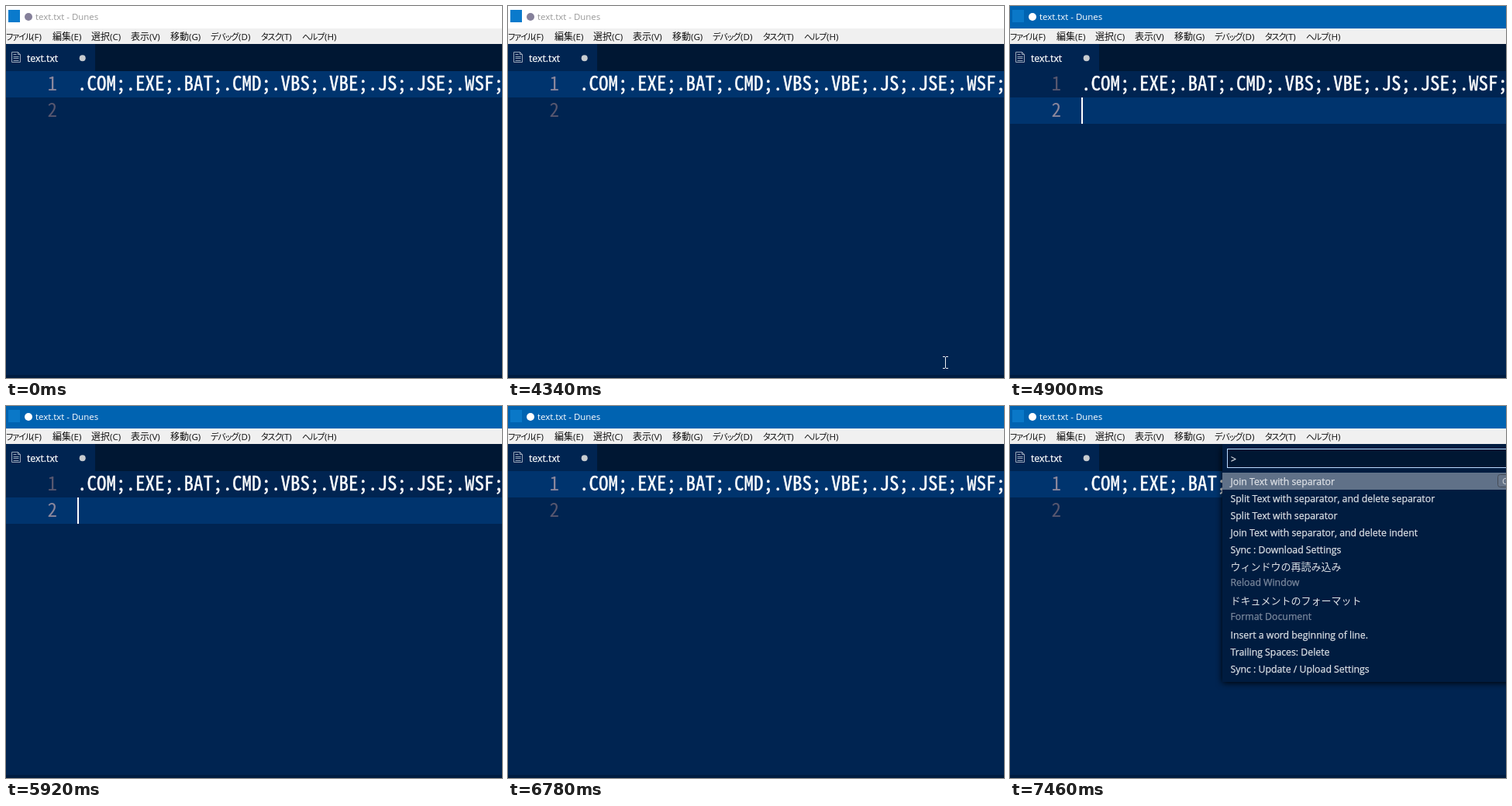
An HTML page for the animation above (8 s loop, 640 by 480 pixels).

```html
<!DOCTYPE html>
<html lang="ja">
<head>
<meta charset="utf-8">
<title>Editor</title>
<style>
  html, body { margin: 0; width: 100%; height: 100%; overflow: hidden; background: #002451; }
  svg { display: block; width: 640px; height: 480px; }
  text { white-space: pre; fill: currentColor; stroke: currentColor; stroke-width: 0; }
  .ui { font: 12.3px "Open Sans", "Noto Sans", sans-serif; stroke-width: .25px; }
  .title { font: 11.45px "Open Sans", "Noto Sans", sans-serif; }
  .key { font: 11.6px "Open Sans", "Noto Sans", sans-serif; }
  .jp { font: 13px "Noto Sans CJK JP", "Noto Sans CJK", sans-serif; }
  .kanji { font: 12px "Noto Sans CJK JP", "Noto Sans CJK", sans-serif; }
  .kana { font: 11px "Noto Sans CJK JP", "Noto Sans CJK", sans-serif;
          font-feature-settings: "palt"; letter-spacing: -1px; }
  .code, .number { font: 25px "Noto Sans Mono CJK JP", "Noto Sans Mono", monospace; }
  .code { stroke-width: .4px; }
</style>
</head>
<body>
<svg id="stage" viewBox="0 0 640 480" xmlns="http://www.w3.org/2000/svg"></svg>
<script>
const LOOP = 8000;
const stage = document.getElementById('stage');

function add(tag, attrs, parent = stage) {
  const el = document.createElementNS('http://www.w3.org/2000/svg', tag);
  for (const name in attrs) el.setAttribute(name, attrs[name]);
  return parent.appendChild(el);
}
const rect = (x, y, width, height, fill, parent) =>
  add('rect', { x, y, width, height, fill }, parent);
function label(str, x, y, cls, color, parent) {
  const el = add('text', { x, y, class: cls, color }, parent);
  el.textContent = str;
  return el;
}
const show = (el, on) => el.setAttribute('visibility', on ? 'visible' : 'hidden');

// Title bar
const titleBar = rect(0, 0, 640, 29, '#fff');
const logo = rect(3, 5, 15, 16, '#0a7acc');
const titleDot = add('circle', { cx: 29, cy: 14, r: 5 });
const titleText = label('text.txt - Dunes', 38, 18, 'title', '#999');

// Menu bar
rect(0, 29, 640, 20, '#f0f0f0');
[
  ['ファイル', 0, '(F)', 33],
  ['編集', 60, '(E)', 84],
  ['選択', 110, '(C)', 134],
  ['表示', 161, '(V)', 185],
  ['移動', 212, '(G)', 236],
  ['デバッグ', 264, '(D)', 300],
  ['タスク', 329, '(T)', 355.5],
  ['ヘルプ', 382, '(H)', 411]
].forEach(([name, x, key, keyX]) => {
  label(name, x, 44, name.length > 2 ? 'kana' : 'kanji', '#111');
  label(key, keyX, 44, 'key', '#111');
});

// Tabs
rect(0, 49, 640, 35, '#001733');
rect(0, 49, 115, 35, '#002451');
add('path', {
  d: 'M7.5 59.5h8l3 3v10h-11zM15.5 59.5v3h3M9.5 62.5h4M9.5 65.5h7M9.5 67.5h7M9.5 70.5h7',
  fill: 'none', stroke: '#9aa5b8'
});
label('text.txt', 27, 72, 'ui', '#fff');
add('circle', { cx: 98.7, cy: 67.2, r: 4, fill: '#c8ccd0' });

// Editor
const lineBar = rect(0, 84, 640, 34, '#00346e');
const numbers = ['1', '2'].map((n, i) => label(n, 53.5, 109 + 34 * i, 'number', '#fff'));
label('.COM;.EXE;.BAT;.CMD;.VBS;.VBE;.JS;.JSE;.WSF;', 92, 109, 'code', '#fff');
const caret = rect(92, 84, 2, 34, '#fff');
rect(0, 476, 640, 4, '#001c40');

// Command palette
const palette = add('g', {});
const clip = add('clipPath', { id: 'below' });
rect(250, 49, 390, 330, '#000', clip);
const shade = add('g', { 'clip-path': 'url(#below)' }, palette);
rect(274, 54, 380, 303, '#000', shade).style.filter = 'blur(4px)';
rect(274, 49, 366, 307, '#001c40', palette);
add('rect', { x: 280.5, y: 55.5, width: 370, height: 24, fill: '#001733', stroke: '#bbdaff' }, palette);
label('>', 285, 73, 'ui', '#e0e4ea', palette);
rect(274, 86, 366, 22, '#607188', palette);
add('rect', { x: 629.5, y: 88.5, width: 24, height: 16, rx: 3, fill: '#657387', stroke: '#454c57' }, palette);
label('C', 635, 101, 'key', '#d0d4da', palette);

let rowY = 97;
[
  ['Join Text with separator'],
  ['Split Text with separator, and delete separator'],
  ['Split Text with separator'],
  ['Join Text with separator, and delete indent'],
  ['Sync : Download Settings'],
  ['ウィンドウの再読み込み', 'Reload Window'],
  ['ドキュメントのフォーマット', 'Format Document'],
  ['Insert a word beginning of line.'],
  ['Trailing Spaces: Delete'],
  ['Sync : Update / Upload Settings']
].forEach(([name, detail]) => {
  label(name, 284.5, rowY + 5, detail ? 'jp' : 'ui', '#dde1e6', palette);
  if (detail) label(detail, 284.5, rowY + 25, 'ui', '#7d8a9e', palette);
  rowY += detail ? 44 : 22;
});
const inputCaret = rect(294, 59, 1, 17, '#fff', palette);

// Mouse pointer
const pointer = add('path', {
  d: 'M0 .5h3M4 .5h3M3.5 1v14M0 15.5h3M4 15.5h3',
  fill: 'none', stroke: '#eceff2'
});
const stops = [[210, 553, 450], [280, 553, 445], [4340, 561, 452]];

function render(t) {
  const focused = t >= 4900;
  const line = t >= 4900 && t < 6320 ? 1 : 0;
  const within = (a, b) => t >= a && t < b;

  titleBar.setAttribute('fill', focused ? '#0063b1' : '#fff');
  logo.setAttribute('fill', focused ? '#0a78c8' : '#0a7acc');
  titleDot.setAttribute('fill', focused ? '#fff' : '#85809a');
  titleText.setAttribute('color', focused ? '#fff' : '#999');

  lineBar.setAttribute('y', 84 + 34 * line);
  numbers.forEach((n, i) => n.setAttribute('color', i === line ? '#8b879c' : '#57576f'));
  caret.setAttribute('y', 84 + 34 * line);
  show(caret, within(4900, 5450) || within(5920, 6780));

  palette.setAttribute('display', t >= 6990 ? 'inline' : 'none');
  show(inputCaret, within(6990, 7460));

  const stop = stops.filter(s => t >= s[0]).pop();
  show(pointer, stop && t < 4430);
  if (stop) pointer.setAttribute('transform', `translate(${stop[1]} ${stop[2]})`);
}

const start = performance.now();
function tick() {
  render((performance.now() - start) % LOOP);
  requestAnimationFrame(tick);
}
tick();
</script>
</body>
</html>
```
